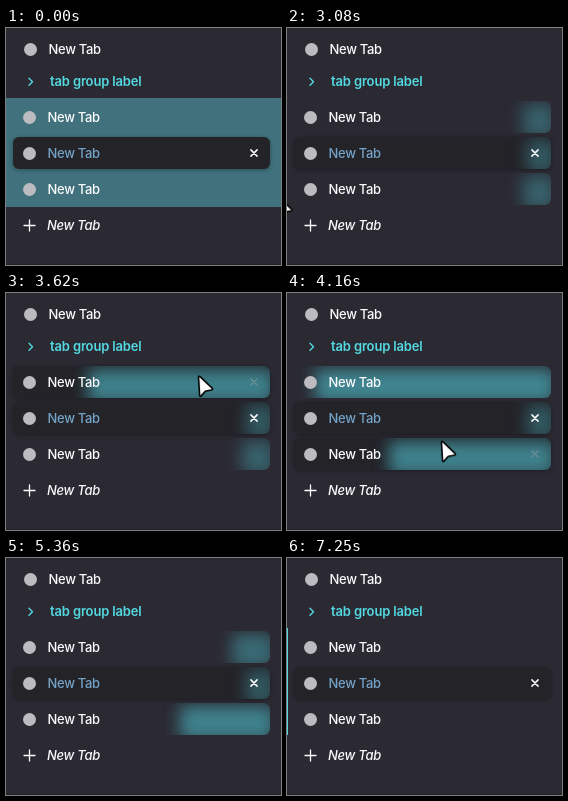
An HTML page for the animation above (8000 ms loop, 275x237 px).

```html
<!DOCTYPE html>
<html lang="en">
<head>
<meta charset="utf-8">
<title>Vertical tab group</title>
<style>
  :root { --bg: #2b2a33; --dark: #232328; --teal: #40717c; --cyan: #53d8e0; --loop: 8s; }
  html, body { margin: 0; width: 100%; height: 100%; overflow: hidden; background: var(--bg); }
  #stage {
    position: relative; width: 275px; height: 237px; overflow: hidden; background: var(--bg);
    color: #fbfbfe; font: 500 13px/32px Inter, "Open Sans", sans-serif; letter-spacing: -.3px; white-space: nowrap;
  }
  #stage * { position: absolute; box-sizing: border-box; }
  svg { overflow: visible; fill: none; stroke-linecap: round; stroke-linejoin: round; }

  .band { left: 0; top: 70px; width: 275px; height: 109px; background: var(--teal); animation: band var(--loop) step-end infinite; }
  .line { left: 0; top: 70px; width: 1px; height: 107px; background: var(--cyan); animation: line var(--loop) linear infinite; }
  .edge { left: 0; bottom: 0; width: 275px; height: 1px; background: #201f27; }

  .tab { left: 7px; width: 257px; height: 32px; }
  .tab > span { left: 34.5px; top: 0; }
  .tab > i { left: 9.5px; top: 9.5px; width: 13px; height: 13px; border-radius: 50%; background: #bcbcc0; }
  .selected { color: #75a3c8; }
  .selected > .bg { opacity: 1; }
  .bg, .fx, .hover { inset: 0; border-radius: 6px; }
  .bg { background: var(--dark); box-shadow: 0 1px 4px #0005; opacity: 0; }
  .fx { overflow: hidden; animation: fx var(--loop) step-end infinite; }
  .glow { right: -4px; top: 3px; bottom: -5px; width: 32px; opacity: .6; background: #408792; filter: blur(8px); }
  .selected .glow { width: 28px; opacity: .55; }
  .hover { opacity: 0; }
  .close { left: 237px; top: 12px; width: 8px; height: 8px; stroke: #fbfbfe; stroke-width: 1.5; }
  .hover .close { stroke: #8f9aa3; stroke-width: 1.2; opacity: .7; }

  .first .glow { animation: glow1 var(--loop) linear infinite; }
  .first .bg, .first .hover { animation: hover1 var(--loop) step-end infinite; }
  .last .glow { animation: glow3 var(--loop) linear infinite; }
  .last .bg, .last .hover { animation: hover3 var(--loop) step-end infinite; }

  .label { left: 44px; top: 37px; color: var(--cyan); font-weight: 600; letter-spacing: -.15px; }
  .add { left: 41px; top: 181px; font-style: italic; }
  .cursor { left: 0; top: 0; width: 17px; height: 23px; animation: move var(--loop) linear infinite, show var(--loop) step-end infinite; }

  @keyframes band { 0% { opacity: 1 } 6.25%, 100% { opacity: 0 } }
  @keyframes line { 0%, 82.4% { opacity: 0 } 87.6%, 100% { opacity: 1 } }
  @keyframes fx { 0% { opacity: 0 } 6.25% { opacity: .9 } 16% { opacity: 1 } 72.75%, 100% { opacity: 0 } }
  @keyframes hover1 { 0% { opacity: 0 } 42.75% { opacity: 1 } 46.2% { opacity: 0 } 49.3% { opacity: 1 } 50.2%, 100% { opacity: 0 } }
  @keyframes hover3 { 0% { opacity: 0 } 50.75% { opacity: 1 } 57.4%, 100% { opacity: 0 } }
  @keyframes glow1 {
    0%, 42.75% { width: 32px; opacity: .6 }
    45.25% { width: 186px; opacity: .95 }
    47%, 50.5% { width: 247px; opacity: 1 }
    52% { width: 240px; opacity: 1 }
    58.4%, 100% { width: 42px; opacity: .7 }
  }
  @keyframes glow3 {
    0%, 50.75% { width: 32px; opacity: .6 }
    52% { width: 166px; opacity: .95 }
    54%, 57.4% { width: 222px; opacity: 1 }
    58.75% { width: 208px; opacity: 1 }
    67% { width: 94px; opacity: .95 }
    71%, 100% { width: 42px; opacity: .7 }
  }
  @keyframes show { 0% { visibility: hidden } 38.5% { visibility: visible } 58.75%, 100% { visibility: hidden } }
  @keyframes move {
    0%, 38.5% { transform: translate(-11px, 168px) }
    45.25% { transform: translate(191px, 82px) }
    47.5% { transform: translate(196px, 60px) }
    48.6% { transform: translate(192px, 53px) }
    50% { transform: translate(174px, 100px) }
    50.75% { transform: translate(163px, 142px) }
    52% { transform: translate(153px, 147px) }
    54% { transform: translate(140px, 177px) }
    56.25% { transform: translate(132px, 165px) }
    58.75%, 100% { transform: translate(128px, 129px) }
  }
</style>
</head>
<body>
<div id="stage">
  <div class="band"></div>
  <div class="line"></div>
  <div class="edge"></div>

  <div class="tab" style="left:8px;top:5px"><i></i><span>New Tab</span></div>

  <svg style="left:23px;top:50px" width="4" height="8" stroke="#53d8e0" stroke-width="1.4"><path d="M0 .3 3.5 3.8 0 7.3"/></svg>
  <div class="label">tab group label</div>

  <div class="tab first" style="top:73px">
    <div class="bg"></div>
    <div class="fx"><div class="glow"></div></div>
    <div class="hover"><svg class="close"><path d="M.9.9l6.2 6.2m0-6.2l-6.2 6.2"/></svg></div>
    <i></i><span>New Tab</span>
  </div>
  <div class="tab selected" style="top:109px">
    <div class="bg"></div>
    <div class="fx"><div class="glow"></div></div>
    <svg class="close"><path d="M.9.9l6.2 6.2m0-6.2l-6.2 6.2"/></svg>
    <i></i><span>New Tab</span>
  </div>
  <div class="tab last" style="top:145px">
    <div class="bg"></div>
    <div class="fx"><div class="glow"></div></div>
    <div class="hover"><svg class="close"><path d="M.9.9l6.2 6.2m0-6.2l-6.2 6.2"/></svg></div>
    <i></i><span>New Tab</span>
  </div>

  <svg style="left:18px;top:192px" width="12" height="12" stroke="#fbfbfe" stroke-width="1.3"><path d="M0 5.5h11M5.5 0v11"/></svg>
  <div class="add">New Tab</div>

  <svg class="cursor"><path d="M1.5 2.2 2.6 20.3Q2.9 22 4.2 20.9L8.3 16.3 14.6 15Q16.3 14.4 15 13.2L3 1.6Q1.5.6 1.5 2.2Z" fill="#fff" stroke="#000" stroke-width="1.6"/></svg>
</div>
</body>
</html>
```
